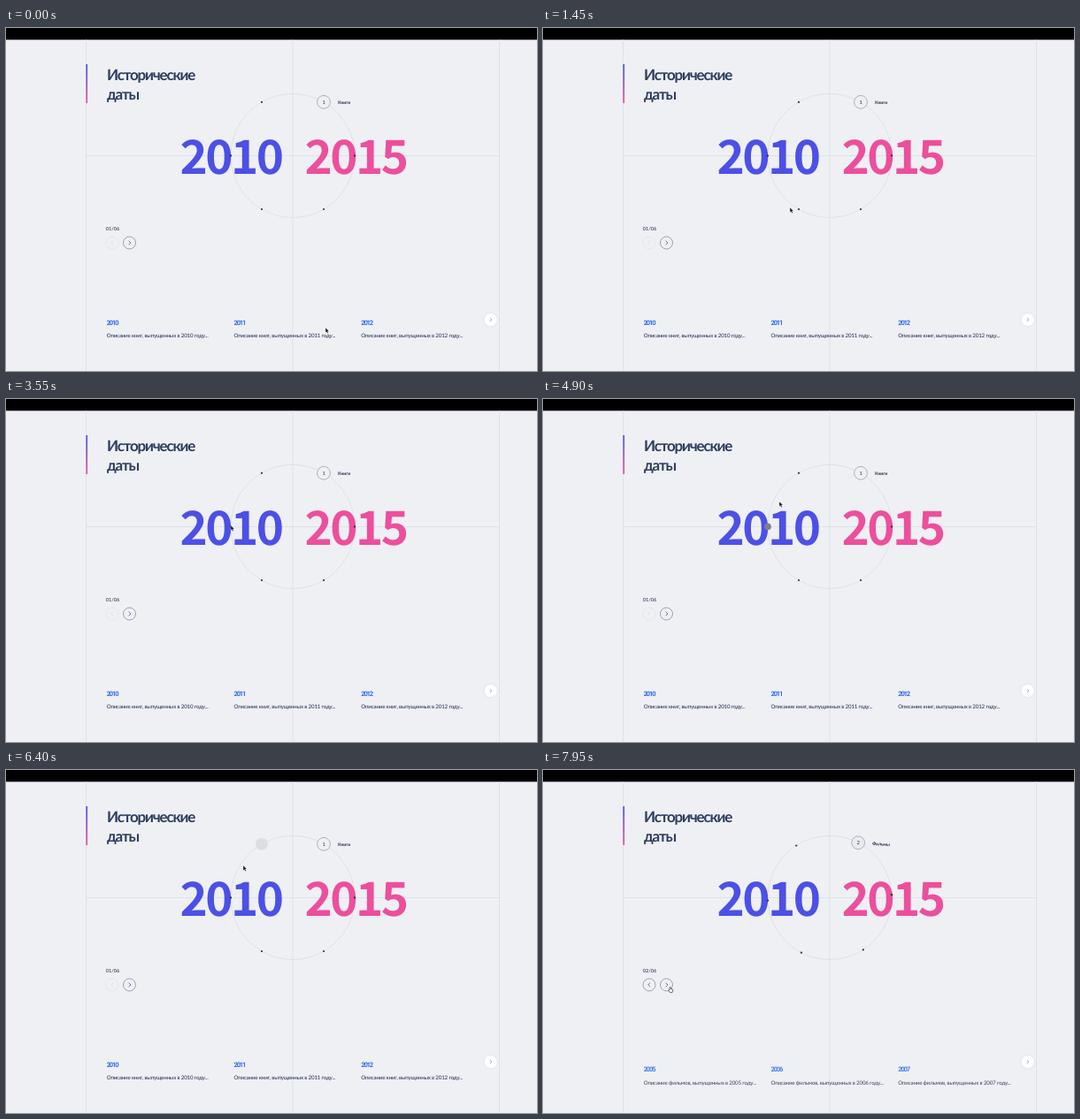
An HTML page that plays this animation: 600 by 388 pixels, repeating every 8000 ms.

```html
<!DOCTYPE html>
<html lang="ru">
<head>
<meta charset="utf-8">
<title>Исторические даты</title>
<style>
html, body { margin: 0; width: 100%; height: 100%; overflow: hidden; background: #eff0f4; }
svg { display: block; width: 600px; height: 388px; font-family: Lato, "Open Sans", sans-serif; text-rendering: geometricPrecision; }
.line { fill: none; stroke: #dadde3; stroke-width: .8; }
.title { font-size: 17px; font-weight: 700; letter-spacing: -1.18px; fill: #2d3d5f; }
.range { font: 700 53px "Noto Sans CJK JP", "Noto Sans CJK SC", "Open Sans", sans-serif; letter-spacing: -2.5px; }
.small { font-size: 5.6px; font-weight: 500; fill: #2b3957; }
.label { font-size: 5.2px; font-weight: 700; letter-spacing: -.1px; fill: #26324f; }
.year { font: 700 7.6px Roboto, sans-serif; letter-spacing: -1.2px; fill: #2f6cea; }
.desc { font-size: 6.2px; font-weight: 500; letter-spacing: -.18px; fill: #2b3957; }
.chevron { fill: none; stroke: #4a5875; stroke-width: .8; }
.ring { fill: none; stroke: #848ea2; stroke-width: .8; }
</style>
</head>
<body>
<svg viewBox="0 0 600 388">
  <defs>
    <linearGradient id="accent" x2="0" y2="1">
      <stop stop-color="#4656e6"/><stop offset="1" stop-color="#ef4f9f"/>
    </linearGradient>
    <filter id="shadow" x="-50%" y="-50%" width="200%" height="200%">
      <feDropShadow dx="0" dy="0" stdDeviation="1.4" flood-color="#3877ee" flood-opacity=".16"/>
    </filter>
  </defs>
  <rect width="600" height="388" fill="#eff0f4"/>
  <rect width="600" height="13.3" fill="#000"/>
  <path class="line" d="M90.5 13V388M324 13V388M557.5 13V388M90.5 144.5H557.5"/>
  <circle class="line" cx="324" cy="144.4" r="70"/>
  <rect x="90.4" y="41" width="1.7" height="44" fill="url(#accent)"/>
  <text class="title" x="114" y="58.5">Исторические</text>
  <text class="title" x="114" y="80.5">даты</text>
  <text class="range" x="196.5" y="164.5" fill="#4c50e6">2010</text>
  <text class="range" x="337.5" y="164.5" fill="#ec4f9c">2015</text>
  <g id="wheel"></g>
  <text class="small" id="page" x="112.7" y="229"></text>
  <g id="prev"><circle class="ring" cx="120" cy="243" r="7"/><path class="chevron" d="M121 240.7L118.7 243L121 245.3"/></g>
  <circle class="ring" cx="139.5" cy="243" r="7"/>
  <path class="chevron" d="M138.6 240.7L140.9 243L138.6 245.3"/>
  <g id="books"></g>
  <g id="films"></g>
  <circle cx="547.7" cy="330" r="7" fill="#fff" filter="url(#shadow)"/>
  <path class="chevron" d="M546.8 328L548.8 330L546.8 332" style="stroke:#7b93c4"/>
  <path id="arrow" d="M0 0V5.6L1.3 4.5L2.2 6.6L3.3 6.1L2.4 4.1H4Z" fill="#111" stroke="#fff" stroke-width=".35"/>
  <path id="hand" d="M-.9 -2.2Q-.2 -3 .4 -2.1V-.3Q1.1 -.9 1.6 -.1Q2.6 -.4 2.7 .8V2.2L2.1 3.6H-.7L-2.3 1.2Q-2.2 .2 -1 .9Z" fill="#fff" stroke="#333" stroke-width=".7"/>
</svg>
<script>
const LOOP = 8000, CLICK = 7680, CENTER = [324, 144.4], RADIUS = 70;
const byId = id => document.getElementById(id);
const clamp = x => Math.max(0, Math.min(1, x));
const mix = (a, b, p) => a + (b - a) * p;
const easeOut = (x, power) => 1 - (1 - clamp(x)) ** power;
const smooth = x => x * x * (3 - 2 * x);

function add(parent, tag, attrs, text = "") {
  const el = document.createElementNS("http://www.w3.org/2000/svg", tag);
  set(el, attrs);
  el.textContent = text;
  parent.append(el);
  return el;
}
function set(el, attrs) {
  for (const name in attrs) el.setAttribute(name, attrs[name]);
}

function addSlides(group, firstYear, topic) {
  for (let i = 0; i < 3; i++) {
    const x = 113.7 + i * 143.8, year = firstYear + i;
    add(group, "text", { x, y: 335.8, class: "year" }, year);
    add(group, "text", { x, y: 350.4, class: "desc" }, `Описание ${topic}, выпущенных в ${year} году...`);
  }
}
addSlides(byId("books"), 2010, "книг");
addSlides(byId("films"), 2005, "фильмов");

// Points run counter-clockwise from the active place at the upper right.
const names = ["Книги", "Фильмы"];
const points = Array.from({ length: 6 }, (_, i) => {
  const group = add(byId("wheel"), "g", {});
  const dot = add(group, "circle", { "stroke-width": .8 });
  const caption = add(group, "g", {});
  if (names[i]) {
    add(caption, "text", { x: 0, y: 1.9, class: "small", "text-anchor": "middle" }, i + 1);
    add(caption, "text", { x: 16, y: 1.9, class: "label" }, names[i]);
  }
  return { group, dot, caption };
});

// point, time entered, time left
const hovers = [[3, 1750, 2850], [2, 3560, 4810], [1, 5230, 6390]];
// time, x, y of the pointer
const path = [
  [0, 361, 339], [250, 360, 336], [1450, 279, 203], [1800, 288, 205], [2800, 289, 206],
  [3550, 254, 143], [4750, 255, 144], [4900, 267, 116], [5300, 288, 85],
  [6250, 287, 86], [6400, 268, 108], [7150, 144, 245], [7650, 144, 248], [8000, 144, 248]
];

function pointerAt(t) {
  const i = path.findIndex(step => step[0] > t), [t0, x0, y0] = path[i - 1], [t1, x1, y1] = path[i];
  const p = smooth((t - t0) / (t1 - t0));
  return [mix(x0, x1, p), mix(y0, y1, p)];
}

function growth(i, t) {
  const swap = clamp((t - CLICK) / 280);
  if (i === 0) return 1 - swap;
  if (i === 1 && t > CLICK) return easeOut(swap, 2.2);
  const hover = hovers.find(h => h[0] === i);
  if (!hover) return 0;
  return clamp((t - hover[1]) / 200) * (1 - clamp((t - hover[2]) / 160));
}

function drawPoint({ group, dot, caption }, i, t) {
  const turn = (t - CLICK) / 420, spin = 60 * easeOut(turn, 3);
  const tilt = spin - 60 * easeOut(turn, 2.25);
  const angle = (-60 - 60 * i + spin) * Math.PI / 180;
  const x = CENTER[0] + RADIUS * Math.cos(angle), y = CENTER[1] + RADIUS * Math.sin(angle);
  const p = growth(i, t), active = i === (t < CLICK ? 0 : 1);
  const resting = i === 0 && t < CLICK;
  const [r, g, b] = [[45, 239], [48, 240], [58, 244]].map(([from, to]) =>
    Math.round(mix(from, resting ? to : to - 5, p)));
  set(group, { transform: `translate(${x} ${y}) rotate(${tilt})` });
  set(dot, { r: mix(1.1, 7.4, p), fill: `rgb(${r},${g},${b})`, stroke: active ? "#98a3b3" : "none" });
  set(caption, { opacity: active ? p : 0 });
}

function draw(t) {
  const clicked = t >= CLICK;
  points.forEach((point, i) => drawPoint(point, i, t));
  byId("page").textContent = clicked ? "02/06" : "01/06";
  set(byId("prev"), { opacity: clicked ? 1 : .13 });

  const rise = easeOut((t - CLICK) / 500, 2);
  set(byId("books"), { opacity: clicked ? 0 : 1 });
  set(byId("films"), { opacity: clicked ? clamp(rise * 1.1) : 0, transform: `translate(0 ${26 * (1 - rise)})` });

  const [x, y] = pointerAt(t);
  const overButton = Math.hypot(x - 139.5, y - 243) < 8;
  const hand = overButton || hovers.some(h => t >= h[1] && t < h[2] - 60);
  set(byId("arrow"), { transform: `translate(${x} ${y})`, opacity: hand ? 0 : 1 });
  set(byId("hand"), { transform: `translate(${x} ${y})`, opacity: hand ? 1 : 0 });
}

function frame() {
  draw(performance.now() % LOOP);
  requestAnimationFrame(frame);
}
frame();
</script>
</body>
</html>
```
